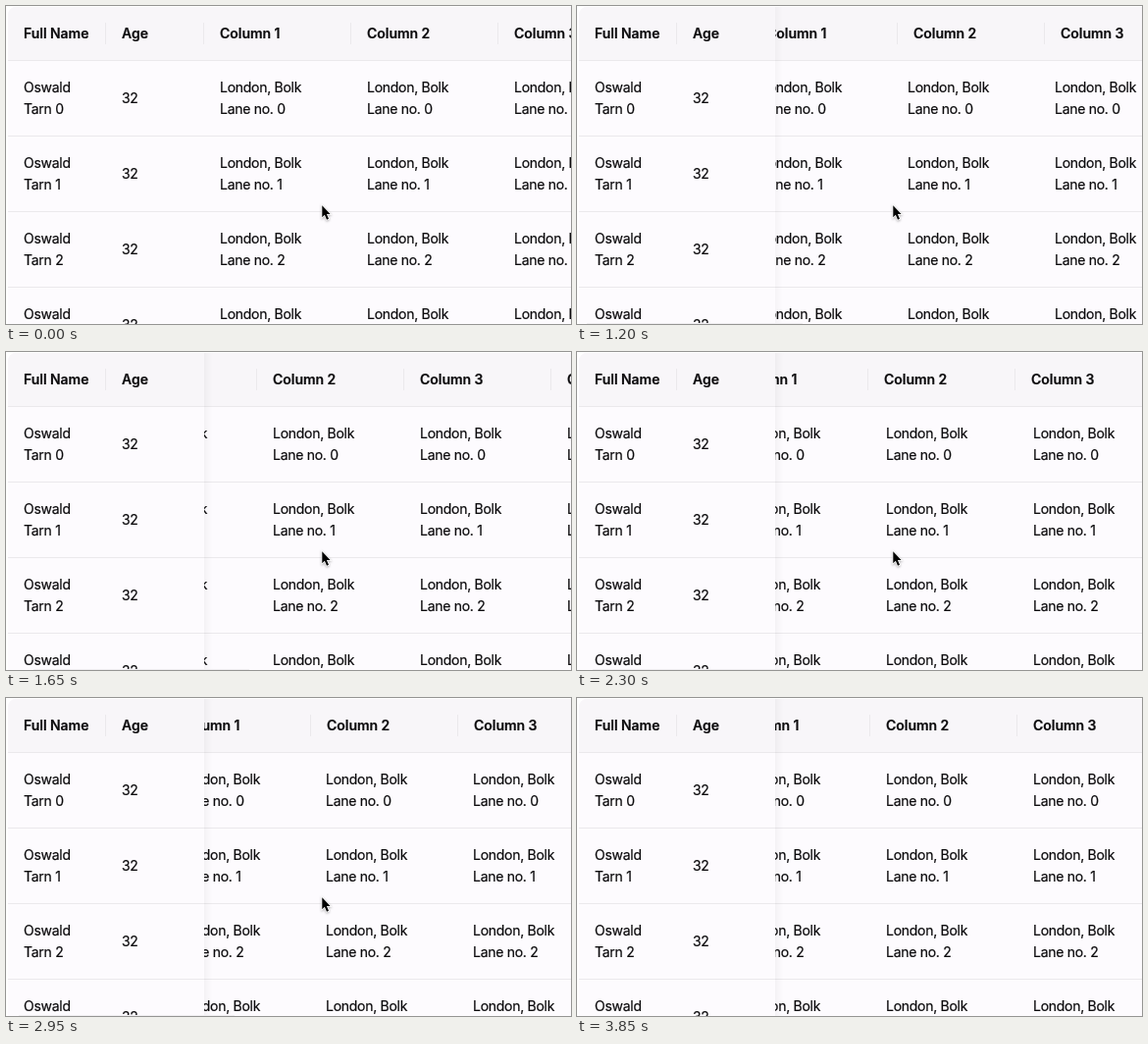
Recreate the animation shown at these times as an HTML page. Size 576 px wide and 324 px high, loop 4000 ms.

```html
<!DOCTYPE html>
<html lang="en">
<head>
<meta charset="utf-8">
<title>Table with fixed columns</title>
<style>
  html, body { margin: 0; width: 100%; height: 100%; overflow: hidden; background: #fff; }
  #stage {
    position: relative; width: 576px; height: 324px; overflow: hidden;
    font: 14px/22px Inter, Roboto, sans-serif; letter-spacing: -.28px; color: #0c0b0d;
    -webkit-text-stroke: .2px;
  }
  #table {
    position: absolute; inset: 1px 0 0 2px; overflow: hidden;
    background: #fdfbfe; border-radius: 8px 0 0 0;
  }
  .row { position: relative; height: 76px; border-bottom: 1px solid #ebe9ec; }
  .head { height: 54px; background: #f8f6f9; font-weight: 600; letter-spacing: -.04px; }
  .clip { position: absolute; inset: 0 0 0 200px; overflow: hidden; }
  .track { position: absolute; left: 0; top: 0; height: 100%; width: 600px; }
  .cell {
    position: absolute; top: 0; height: 100%; padding-left: 16px; box-sizing: border-box;
    display: flex; align-items: center; white-space: nowrap;
  }
  .head .cell::after {
    content: ""; position: absolute; right: 0; top: 16px; width: 1px; height: 22px; background: #ebe9ec;
  }
  .pinged .head > .cell:nth-of-type(2)::after { display: none; }
  #shadow {
    position: absolute; left: 200px; top: 0; bottom: 0; width: 30px;
    box-shadow: inset 10px 0 8px -8px rgba(5, 5, 5, .06);
  }
  #thumb { position: absolute; left: 2px; top: 323px; width: 220px; height: 1px; background: #f0eef1; }
  #cursor { position: absolute; left: 318px; top: 199px; filter: drop-shadow(0 1px 1px rgba(0, 0, 0, .3)); }
</style>
</head>
<body>
<div id="stage">
  <div id="table"></div>
  <div id="thumb"></div>
  <svg id="cursor" width="18" height="24" viewBox="-4 -4 18 24">
    <path d="M.3 .3V12.2L2.9 9.8L5 14.7L7 13.8L4.9 9H8.6Z" fill="#000" stroke="#fff" stroke-width="1.6" paint-order="stroke"/>
  </svg>
</div>
<script>
  const LOOP = 4000, STEP = 50;
  // [time, scroll offset] of the table body
  const PATH = [
    [950, 0], [1050, 8], [1200, 31], [1350, 55], [1400, 62], [1500, 78], [1605, 96],
    [2050, 96], [2100, 87], [2200, 65], [2250, 58], [2300, 53], [2400, 42], [2530, 34],
    [2700, 34], [2800, 36], [2900, 40], [2950, 42], [3050, 47], [3175, 53]
  ];
  const $ = id => document.getElementById(id);
  const clamp = v => Math.min(1, Math.max(0, v));

  const cell = (x, w, html) =>
    `<div class="cell" style="left:${x}px;width:${w}px"><span>${html}</span></div>`;

  function row(cls, name, age, column) {
    const cols = [1, 2, 3, 4].map((n, i) => cell(i * 150, 150, column(n))).join('');
    return `<div class="row ${cls}">${cell(0, 100, name)}${cell(100, 100, age)}` +
      `<section class="clip"><div class="track">${cols}</div></section></div>`;
  }

  const table = $('table');
  table.innerHTML = row('head', 'Full Name', 'Age', n => `Column ${n}`) +
    [0, 1, 2, 3].map(i =>
      row('', `Oswald<br>Tarn ${i}`, 32, () => `London, Bolk<br>Lane no. ${i}`)).join('') +
    '<div id="shadow"></div>';
  const tracks = [...table.querySelectorAll('.track')];

  function scrollAt(t) {
    const i = PATH.findIndex(p => p[0] > t);
    if (i === 0) return 0;
    if (i < 0) return PATH[PATH.length - 1][1];
    const [t0, a] = PATH[i - 1], [t1, b] = PATH[i];
    return Math.round(a + (b - a) * (t - t0) / (t1 - t0));
  }

  function draw(t) {
    const body = scrollAt(t);
    const head = scrollAt(t - (t < 2000 ? 42 : 22)); // the header trails the body
    tracks.forEach((el, i) => {
      el.style.transform = `translateX(${-(i ? body : head)}px)`;
    });
    table.classList.toggle('pinged', body > 0);
    $('shadow').style.opacity = clamp((t - 950) / 300);
    $('thumb').style.opacity = t < 1000 ? 0 : clamp((3850 - t) / 150);
    $('thumb').style.transform = `translateX(${Math.round(body * .27)}px)`;
    $('cursor').style.visibility = t < 3500 ? 'visible' : 'hidden';
  }

  const start = performance.now();
  function tick() {
    const t = (performance.now() - start) % LOOP;
    draw(Math.floor(t / STEP) * STEP);
    requestAnimationFrame(tick);
  }
  tick();
</script>
</body>
</html>
```
